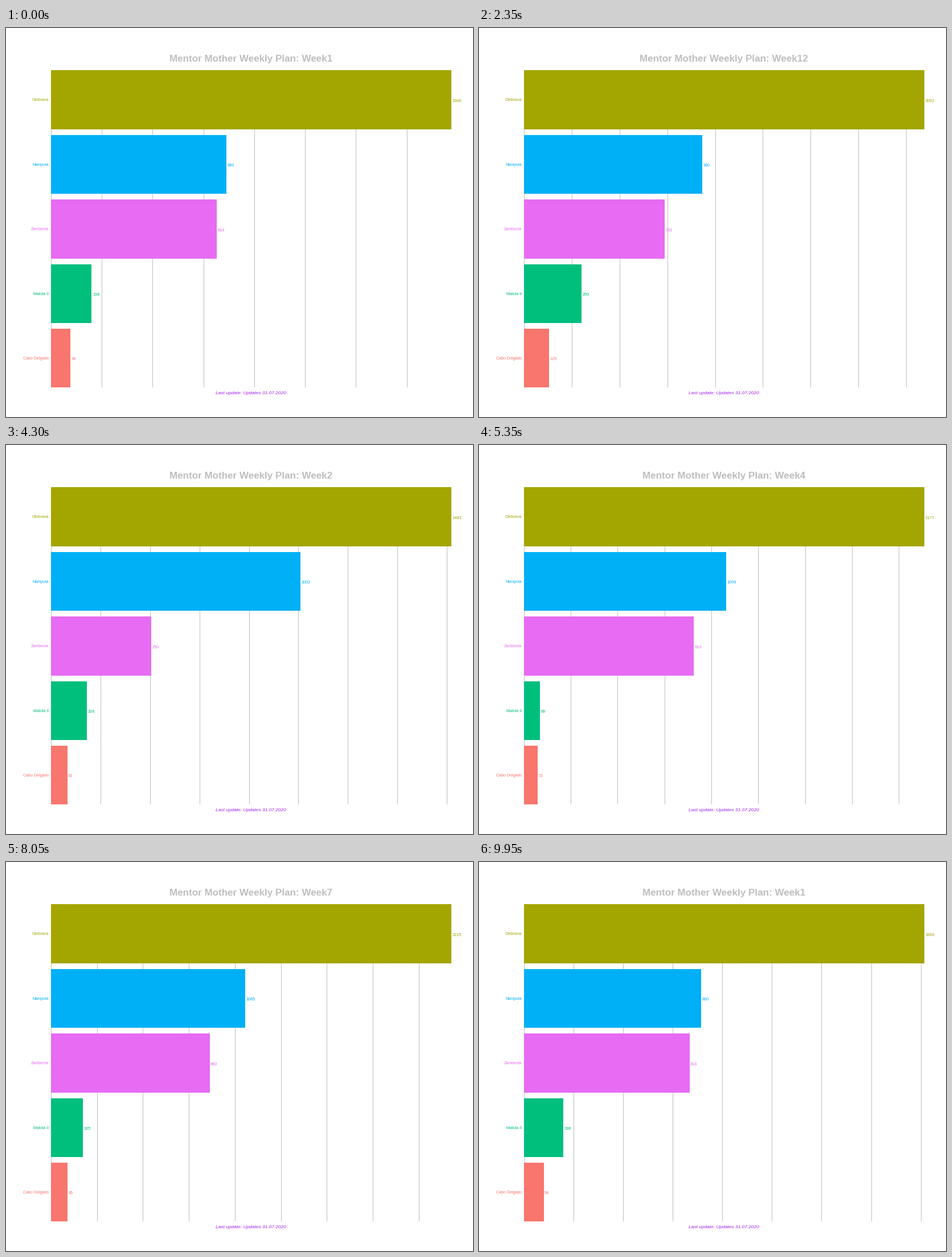
These frames come from a looping animation (820 by 683 pixels, 10 s). A matplotlib script:

```python
import math

import matplotlib.pyplot as plt
from matplotlib.animation import FuncAnimation
from matplotlib.patches import Rectangle

WIDTH, HEIGHT, DPI = 820, 683, 64
FRAMES, INTERVAL = 200, 50
LEFT, SPAN = 79.3, 702          # zero line and full bar length
TOP, PITCH, BAR = 74.4, 113.4, 103.4
GREY = "#BEBEBE"

REGIONS = [
    ("Ombrava", "#A3A500"),
    ("Nampula", "#00B0F6"),
    ("Zambezia", "#E76BF3"),
    ("Matola II", "#00BF7D"),
    ("Cabo Delgado", "#F8766D"),
]
# The first bar is the sum of the regional values.
WEEKS = [
    (1, (860, 814, 198, 94)),
    (10, (1010, 885, 226, 115)),
    (11, (980, 830, 261, 123)),
    (12, (930, 733, 299, 129)),
    (13, (950, 640, 250, 105)),
    (2, (1002, 250, 168, 63)),
    (3, (1013, 863, 69, 66)),
    (4, (1099, 916, 89, 73)),
    (5, (1025, 870, 112, 73)),
    (6, (1238, 960, 144, 69)),
    (7, (1085, 880, 165, 85)),
    (8, (915, 769, 200, 100)),
    (9, (1200, 1009, 171, 124)),
]
STATES = [(week, (sum(parts), *parts)) for week, parts in WEEKS]
# (first moving frame, number of moving frames) for each change of week
MOVES = [(4 + 16 * k, 12) if k < 6 else (100 + 15 * (k - 6), 11)
         for k in range(len(STATES))]


def phase(frame):
    """Index of the current week and the progress towards the next one."""
    for k in reversed(range(len(MOVES))):
        start, length = MOVES[k]
        if frame >= start:
            return k, min(1, (frame - start + 1) / length)
    return 0, 0


def axis_step(top):
    """Major axis step, chosen by simplicity, coverage and density."""
    def score(step, simplicity, count):
        last = step * count
        coverage = 1 - 0.5 * ((top - last) / (0.1 * top)) ** 2
        ratio = max(last, top) / (4 * step)
        density = 2 - max(ratio, 1 / ratio)
        return 0.25 * simplicity + 0.2 * coverage + 0.5 * density

    options = [(score(step, simplicity, n), step)
               for step, simplicity in ((500, 0.8), (400, 0.2))
               for n in (math.floor(top / step), math.ceil(top / step))]
    return max(options)[1]


fig = plt.figure(figsize=(WIDTH / DPI, HEIGHT / DPI), dpi=DPI, facecolor="white")
ax = fig.add_axes([0, 0, 1, 1])
ax.set_xlim(0, WIDTH)
ax.set_ylim(HEIGHT, 0)
ax.axis("off")


def add_text(x, y, text, px, color, **style):
    return ax.text(x, y, text, fontsize=px * 72 / DPI, color=color,
                   family="Liberation Sans", va="baseline", zorder=3, **style)


def add_rect(x, top, width, bottom, color, zorder):
    rect = Rectangle((x, top), width, bottom - top, facecolor=color,
                     linewidth=0, antialiased=False, zorder=zorder)
    return ax.add_patch(rect)


title = add_text(430, 59, "", 17, GREY, weight="bold", ha="center")
add_text(430, 643, "Last update: Updates 31.07.2020", 8.4, "#A020F0",
         style="italic", ha="center")
grid = [add_rect(79, 74, 1, 631, GREY, 1) for _ in range(12)]
bars, labels = [], []
for row, (name, color) in enumerate(REGIONS):
    top = TOP + PITCH * row
    bars.append(add_rect(79, round(top), 1, round(top + BAR), color, 2))
    labels.append(add_text(0, round(top + 55.4), "", 7.2, color))
    add_text(75.3, round(top + 54), name, 7.15, color, ha="right")


def draw(frame):
    k, t = phase(frame)
    old, new = STATES[k], STATES[(k + 1) % len(STATES)]
    week, shown = new if t >= 0.5 else old
    values = [a + (b - a) * t for a, b in zip(old[1], new[1])]
    scale = SPAN / values[0]

    title.set_text(f"Mentor Mother Weekly Plan: Week{week}")
    for bar, label, value, number in zip(bars, labels, values, shown):
        end = LEFT + value * scale
        bar.set_width(math.floor(end) + 1 - 79)
        label.set_x(end + 2)
        label.set_text(str(number))

    gap = axis_step(values[0]) / 2
    for i, line in enumerate(grid):
        line.set_visible(i * gap <= values[0])
        line.set_x(math.floor(LEFT + i * gap * scale))
    return [title, *bars, *labels, *grid]


anim = FuncAnimation(fig, draw, frames=FRAMES, interval=INTERVAL,
                     repeat=True, repeat_delay=0, blit=False)
plt.show()
```
